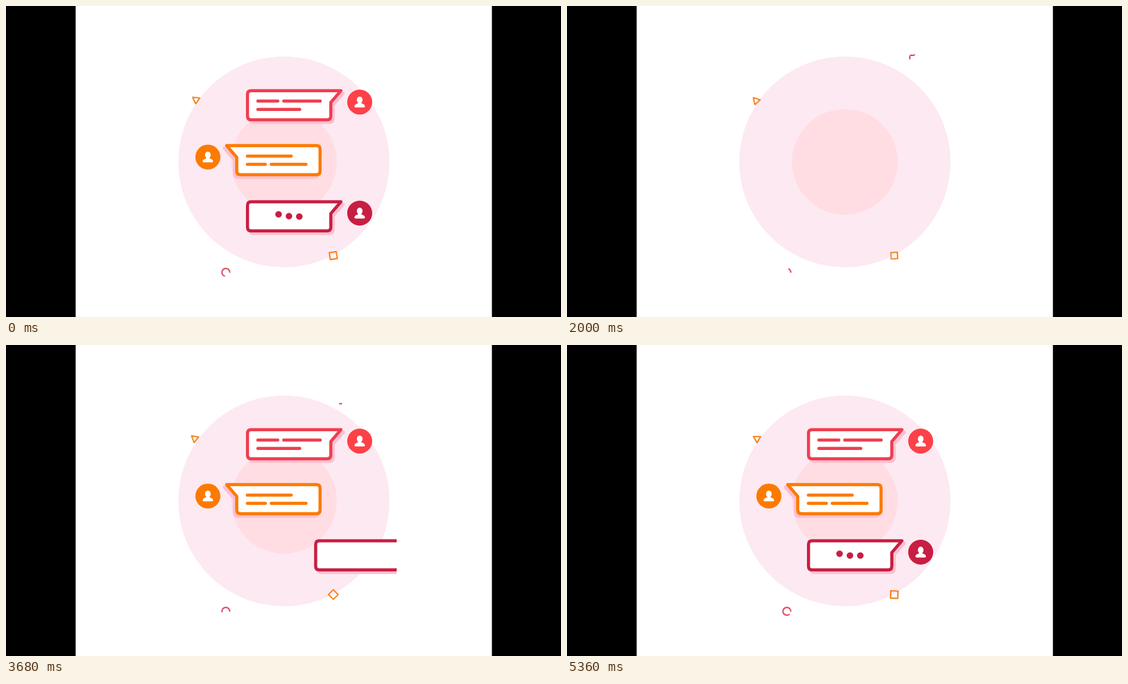
An HTML page without scripts that plays this animation: 976x548 px, repeating every 5440 ms.

```html
<!DOCTYPE html>
<html lang="en">
<head>
<meta charset="utf-8">
<title>Chat bubbles</title>
<style>
html, body { margin: 0; width: 100%; height: 100%; overflow: hidden; background: #000; }
svg { display: block; width: 976px; height: 548px; }

.red { --c: #ee3f50; --a: #fd4148; --x: 300px; }
.orange { --c: #fd7a00; --a: #fd7a00; --x: -300px; }
.wine { --c: #c81e43; --a: #c81e43; --x: 300px; }

.bubble { fill: #fff; stroke: var(--c); stroke-width: 5.5; stroke-linejoin: round; }
.shadow { fill: #fbbfd0; stroke: #fbbfd0; stroke-width: 5.5; stroke-linejoin: round; }
.lines { fill: none; stroke: var(--c); stroke-width: 5.5; stroke-linecap: round; }
.face { fill: var(--a); }
.mark { fill: none; stroke-width: 2.2; stroke-linejoin: round; }
.warm { stroke: #f57c14; }
.cool { stroke: #d93a50; }

/* messages */
.chat { animation: fade 5440ms linear infinite; }
.red { animation: slide1 5440ms infinite; }
.orange { animation: slide2 5440ms infinite; }
.wine { animation: slide3 5440ms infinite; }

@keyframes fade {
  0%, 31.6% { opacity: 1; }
  36%, 44% { opacity: 0; }
  44.1%, 100% { opacity: 1; }
}
@keyframes slide1 {
  0%, 36.5% { transform: none; animation-timing-function: step-start; }
  36.6%, 45.5% { transform: translateX(var(--x)); animation-timing-function: cubic-bezier(.7, 0, .3, 1); }
  53.2%, 100% { transform: none; }
}
@keyframes slide2 {
  0%, 36.5% { transform: none; animation-timing-function: step-start; }
  36.6%, 55.4% { transform: translateX(var(--x)); animation-timing-function: cubic-bezier(.7, 0, .3, 1); }
  63.1%, 100% { transform: none; }
}
@keyframes slide3 {
  0%, 36.5% { transform: none; animation-timing-function: step-start; }
  36.6%, 63.55% { transform: translateX(var(--x)); animation-timing-function: cubic-bezier(.7, 0, .3, 1); }
  71.3%, 100% { transform: none; }
}

/* typing dots */
.dots { fill: var(--c); animation: type 5440ms linear infinite; }
.dots circle { animation: hop 544ms ease-in-out infinite; animation-delay: var(--d); }
@keyframes type {
  0%, 36.5% { opacity: 1; }
  36.6%, 75% { opacity: 0; }
  79.4%, 100% { opacity: 1; }
}
@keyframes hop {
  0%, 70%, 100% { transform: none; }
  35% { transform: translateY(-4px); }
}

/* small marks */
.turn { animation: turn 5440ms steps(68) infinite; }
.spin { animation: spin 5440ms steps(68) infinite; }
.pulse { animation: pulse 1813.333ms ease-in-out -393ms infinite; }
.ring { stroke-dasharray: 360 360; stroke-linecap: round;
  animation: ring 1813.333ms cubic-bezier(.7, 0, .3, 1) -393ms infinite; }
.worm { animation: worm 5440ms linear infinite; }
@keyframes turn { to { transform: rotate(360deg); } }
@keyframes spin { from { transform: rotate(-8deg); } to { transform: rotate(-728deg); } }
@keyframes pulse {
  0%, 100% { transform: scale(1.14); }
  50% { transform: scale(.87); }
}
@keyframes ring {
  0%, 100% { stroke-dashoffset: 0; }
  50% { stroke-dashoffset: 360; }
}
@keyframes worm {
  0%, 8.8% { stroke-dasharray: 0 300; stroke-dashoffset: 0; }
  23.5% { stroke-dasharray: 17 300; stroke-dashoffset: 0; }
  36.8% { stroke-dasharray: 40 300; stroke-dashoffset: 0; }
  58.8% { stroke-dasharray: 38 300; stroke-dashoffset: -47; }
  67.6% { stroke-dasharray: 13 300; stroke-dashoffset: -87; }
  74.5%, 100% { stroke-dasharray: 0 300; stroke-dashoffset: -100; }
}
</style>
</head>
<body>
<svg viewBox="0 0 976 548">
  <defs>
    <path id="box" d="M431 149.3H589L571.2 170V194Q571.2 200.5 564.7 200.5H431Q424.7 200.5 424.7 194V155.8Q424.7 149.3 431 149.3Z"/>
    <g id="bubble">
      <use href="#box" class="shadow" x="4" y="4.5"/>
      <use href="#box" class="bubble"/>
    </g>
    <g id="face">
      <circle r="22" class="face"/>
      <ellipse cy="-3.8" rx="5" ry="6" fill="#fff"/>
      <path d="M-3 0H3V2.2Q9.3 3.8 9.3 7.6Q9.3 9.4 7.5 9.4H-7.5Q-9.3 9.4 -9.3 7.6Q-9.3 3.8 -3 2.2Z" fill="#fff"/>
    </g>
    <clipPath id="window"><rect x="291" y="80" width="395.5" height="400"/></clipPath>
  </defs>

  <rect x="122.5" width="732" height="548" fill="#fff"/>
  <circle cx="488.7" cy="274.7" r="185.7" fill="#fde9f2"/>
  <circle cx="488.7" cy="274.7" r="93" fill="#ffdde3"/>

  <g transform="translate(333 165.6)"><g class="turn">
    <path class="mark warm" transform="translate(1.2 -.5) rotate(95.5)" d="M7.3 0L-3.65 6.32V-6.32Z"/>
  </g></g>
  <g transform="translate(575.5 439.8)"><g class="spin">
    <rect class="mark warm pulse" x="-6" y="-6" width="12" height="12"/>
  </g></g>
  <g transform="translate(386.6 469.3) scale(1 -1)">
    <circle class="mark cool ring" r="6.9" pathLength="360"/>
  </g>
  <path class="mark cool worm" pathLength="100" d="M611.8 85.6Q608.5 87.8 606 86.6Q602.3 86.6 602.8 91Q603.3 95.4 600 95.4Q594.6 94.6 595 98.5Q596.4 102 592.5 104Q589.5 103.2 586 103.4"/>

  <g clip-path="url(#window)"><g class="chat">
    <g class="red">
      <use href="#bubble"/>
      <path class="lines" d="M443 167.4H478M488.5 167.4H552.5M443 182.2H516.5"/>
      <use href="#face" x="622" y="169.3"/>
    </g>
    <g class="orange">
      <use href="#bubble" transform="translate(977 96.7) scale(-1 1)"/>
      <path class="lines" d="M424.5 264.4H501.5M424.5 279H456M466.5 279H527.5"/>
      <use href="#face" x="355" y="266.2"/>
    </g>
    <g class="wine">
      <use href="#bubble" y="195.7"/>
      <g class="dots">
        <circle cx="479.3" cy="371" r="5.8" style="--d:-210ms"/>
        <circle cx="497.6" cy="371" r="5.8" style="--d:-55ms"/>
        <circle cx="515.8" cy="371" r="5.8" style="--d:-474ms"/>
      </g>
      <use href="#face" x="622" y="365"/>
    </g>
  </g></g>
</svg>
</body>
</html>
```
